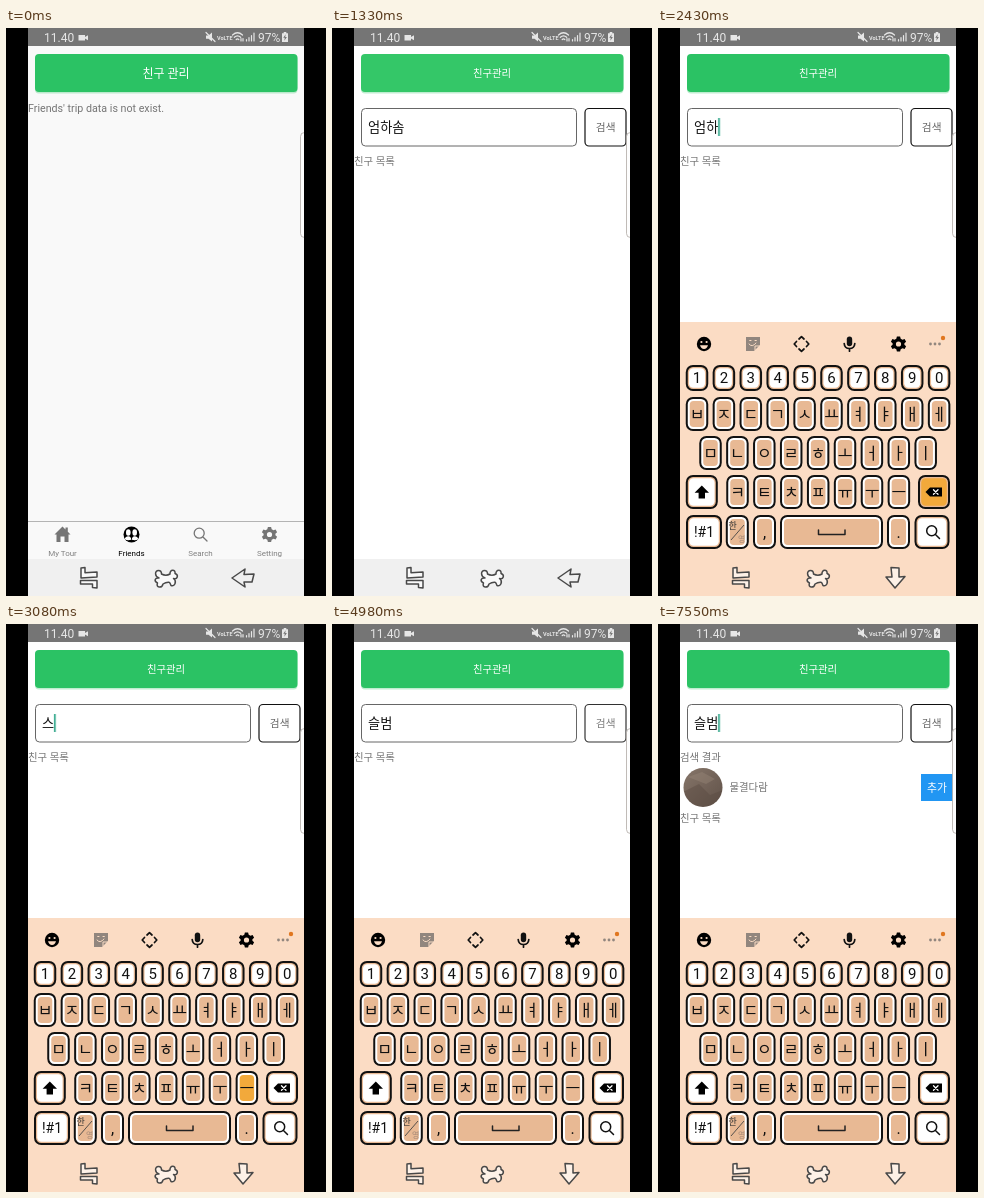
These frames come from a looping animation (320x568 px, 8000 ms). An HTML page:

```html
<!DOCTYPE html>
<html lang="ko">
<head>
<meta charset="utf-8">
<title>Friend search</title>
<style>
  html, body { margin: 0; width: 100%; height: 100%; overflow: hidden; background: #000; }
  svg { display: block; width: 100%; height: 100%; }
  text { font-family: Roboto, "Noto Sans CJK KR", "Noto Sans CJK", sans-serif; }
  .mid { text-anchor: middle; }
  .grey { fill: #757575; font-size: 10.4px; }
  .line { fill: none; stroke-linejoin: round; stroke-linecap: round; }
  .nav { stroke: #484848; stroke-width: 1.5; }
</style>
</head>
<body>
<svg viewBox="0 0 320 568">
  <defs>
    <clipPath id="phone"><rect x="22" width="276" height="568"/></clipPath>
    <clipPath id="round"><circle cx="45" cy="163.5" r="19.5"/></clipPath>
    <linearGradient id="earth" x2="1" y2="1">
      <stop stop-color="#87766a"/><stop offset="1" stop-color="#5f5047"/>
    </linearGradient>
    <path id="gear" d="M-1.6-7.4H1.6L2.2-5.2 4-4.2 6.1-5 7.6-2.2 5.9-.8V.8L7.6 2.2 6.1 5 4 4.2 2.2 5.2 1.6 7.4H-1.6L-2.2 5.2-4 4.2-6.1 5-7.6 2.2-5.9.8V-.8L-7.6-2.2-6.1-5-4-4.2-2.2-5.2ZM0-2.6A2.6 2.6 0 1 0 0 2.6 2.6 2.6 0 1 0 0-2.6Z" fill-rule="evenodd"/>
    <path id="lens" class="line" d="M3.2 3.2 7 7M4.2-.8A5 5 0 1 1-5.8-.8 5 5 0 1 1 4.2-.8Z"/>
  </defs>
  <rect width="320" height="568"/>
  <g clip-path="url(#phone)">
    <rect x="22" width="276" height="568" fill="#f9f9f9"/>

    <g id="home">
      <g id="manage">
        <rect x="29" y="27" width="262.5" height="38.5" rx="4" fill="#2bc264" opacity=".3"/>
        <rect x="29" y="26" width="262.5" height="38" rx="4" fill="#2bc264"/>
        <text class="mid" x="160" y="50" font-size="12" fill="#fff">친구 관리</text>
      </g>
      <text x="22" y="83.5" font-size="10.7" fill="#757575">Friends' trip data is not exist.</text>
      <path d="M22 493.5H298" stroke="#b4b4b4"/>
      <g fill="#757575">
        <path d="M48.5 506.5 56.5 498.5 59.5 501.5V499.5H61.8V503.8L64.5 506.5H62.5V514H58.5V508.5H54.5V514H50.5V506.5Z"/>
        <use href="#lens" x="194" y="506" stroke="#757575" stroke-width="1.3"/>
        <use href="#gear" x="263.5" y="506.5"/>
      </g>
      <circle cx="125.5" cy="506.5" r="8"/>
      <g fill="#fff">
        <ellipse cx="122.3" cy="504.5" rx="2.3" ry="3.2"/><ellipse cx="128.7" cy="504.5" rx="2.3" ry="3.2"/>
        <path d="M118.8 511Q119.5 508.2 122.3 508.2T125.2 511.8Q121 513 118.8 511ZM125.8 511.8Q126 508.2 128.7 508.2T132.2 511Q130 513 125.8 511.8Z"/>
      </g>
      <g id="tabs" class="mid" font-size="8"></g>
    </g>

    <g id="search">
      <rect x="22" y="18" width="276" height="514" fill="#fff"/>
      <rect x="29" y="27" width="262.5" height="38.5" rx="4" fill="#2bc264" opacity=".3"/>
      <rect x="29" y="26" width="262.5" height="38" rx="4" fill="#2bc264" id="header"/>
      <text class="mid" x="160" y="49.3" font-size="10.4" fill="#fff">친구관리</text>
      <rect x="29.5" y="80.5" width="215" height="37.5" rx="4" fill="#fff" stroke="#666"/>
      <g id="query" font-size="13.2" fill="#111"></g>
      <path id="compose" d="M36 107.5H60" stroke="#333" stroke-width=".8"/>
      <rect id="caret" x="35.9" y="90" width="1.6" height="18" fill="#1f9f80"/>
      <g id="find">
        <rect x="253" y="80.5" width="41" height="37.5" rx="4" fill="#fff" stroke="#111" stroke-width="1.2"/>
        <text class="mid" x="273.7" y="103" font-size="10.7" fill="#666">검색</text>
      </g>
      <text id="list" class="grey" x="22" y="137">친구 목록</text>
      <g id="result">
        <text class="grey" x="22" y="137">검색 결과</text>
        <g id="avatar" clip-path="url(#round)">
          <rect x="25" y="144" width="40" height="40" fill="url(#earth)"/>
          <path d="M25 168 41 160 52 171 65 166V184H25Z" fill="#594b42" opacity=".45"/>
          <path d="M30 153 44 148 57 155 48 160Z" fill="#9a897b" opacity=".4"/>
        </g>
        <text class="grey" x="71.5" y="167">물결다람</text>
        <rect x="263" y="150" width="32" height="27" fill="#2196f3"/>
        <text class="mid" x="279" y="168" font-size="10.8" fill="#fff">추가</text>
      </g>
    </g>

    <rect x="294.5" y="104.5" width="12" height="105" rx="4" fill="#fdfdfd" stroke="#b0aaa5" stroke-width=".8"/>

    <g id="status" fill="#e6e6e6">
      <rect x="22" width="276" height="18" fill="#757575"/>
      <text x="38" y="13.7" font-size="12">11.40</text>
      <path d="M72.5 7H79V9L82 7.2V12.3L79 10.5V12.5H72.5Z"/>
      <path d="M200 7.5H202.5L206 4.5V13.5L202.5 10.8H200Z"/>
      <path class="line" d="M200 4.5 209 13.5" stroke="#e6e6e6" stroke-width="1.2"/>
      <text x="211" y="12" font-size="5.5" font-weight="700" textLength="0">VoLTE</text>
      <g class="line" stroke="#e6e6e6" stroke-width="1.2">
        <path d="M226.5 7Q231.5 2.5 236.5 7M228.3 9.3Q231.5 6.3 234.7 9.3M230.2 11.5Q231.5 10.3 232.8 11.5M235 13V10.5M237 13V10.5"/>
        <path d="M240.5 13V11.5M243 13V9.5M245.5 13V7.5M248 13V5"/>
      </g>
      <text x="252" y="13.7" font-size="12">97%</text>
      <path d="M276 5.2H277.7V4H280.3V5.2H282V14H276Z"/>
      <path d="M279.7 6.2 277.2 9.8H278.8L278.3 12.8 280.9 9H279.2Z" fill="#757575"/>
    </g>

    <rect x="22" y="531" width="276" height="37" fill="#f0f0f0"/>
    <g id="keyboard">
      <rect x="22" y="294" width="276" height="290" fill="#fbdcc4"/>
      <circle cx="46" cy="316" r="7.2"/>
      <g fill="#fbdcc4"><circle cx="43.4" cy="314" r="1.1"/><circle cx="48.6" cy="314" r="1.1"/><path d="M42 317.3H50Q49 321 46 321T42 317.3Z"/></g>
      <path d="M88 309H102V317L96 323H88Z" fill="#91867e"/>
      <path class="line" d="M97 322V318H101.5M91 316Q94 320 98 315M91.7 312.5H93M97 312.5H98.3" stroke="#fbdcc4"/>
      <g class="line" stroke="#111" stroke-width="1.7">
        <path d="M141 311 143.5 308.7 146 311M141 321 143.5 323.3 146 321M138.5 313.5 136.2 316 138.5 318.5M148.5 313.5 150.8 316 148.5 318.5"/>
        <path d="M186.2 315.5Q186.5 320.5 191.5 320.5T196.8 315.5M191.5 320.5V323.2"/>
      </g>
      <rect x="188.8" y="308.5" width="5.4" height="9.8" rx="2.7" fill="#111"/>
      <use href="#gear" x="240.5" y="316"/>
      <g fill="#91867e"><circle cx="272.5" cy="316" r="1.4"/><circle cx="277" cy="316" r="1.4"/><circle cx="281.5" cy="316" r="1.4"/></g>
      <circle cx="285" cy="310" r="2.2" fill="#e0761f"/>
      <g id="keys"></g>
      <path d="M43.8 457.5 51 464.8H47V470.5H40.6V464.8H36.6Z"/>
      <path d="M267.5 464 272 459.5H284V468.5H272Z"/>
      <path class="line" d="M275.5 461.7 280 466.3M280 461.7 275.5 466.3" stroke="#fff" stroke-width="1.3"/>
      <path class="line" d="M160.5 502V506.5H187V502" stroke="#222" stroke-width="1.5"/>
      <use href="#lens" x="274.5" y="503.5" stroke="#111" stroke-width="1.5"/>
      <path d="M73 512 86 497" stroke="#444" stroke-width=".9"/>
      <text x="70.5" y="501" font-size="9" fill="#333">한</text>
      <text x="80" y="514" font-size="8" fill="#a58a78">영</text>
    </g>
    <g class="line nav">
      <path d="M75 540 79 539.5V544.8L91 544V549L75 550ZM74.5 552.5H91V560L86.5 559.5V556H74.5Z" fill="#fff" fill-opacity=".6"/>
      <path d="M155.5 546Q160 548.5 164 546C163.5 541 170 541 169 545.5 173 547 171.5 551.5 167.5 550.5 171 553 169 559 165 557.5Q164 554.5 163 554.3 160 554 157 556C156 560.5 149.5 560 151.5 555 147.5 553 149 549.5 153 550 148.5 548.5 148.5 542.5 152.5 542.5 155 542.5 155.5 544.5 155.5 546Z" fill="#fff" fill-opacity=".6"/>
      <path id="back" d="M226 550 239 541 238 546.5 248 546 246 554 238 554 239 559Z"/>
      <path id="hide" d="M237 560 228 549H234L233 539.5 241 540V549L247 548.5Z" fill="#fff" fill-opacity=".6"/>
    </g>
  </g>
</svg>
<script>
const LOOP = 8000, END = LOOP;
const $ = id => document.getElementById(id);

function add(parent, tag, attrs, label) {
  const el = document.createElementNS('http://www.w3.org/2000/svg', tag);
  for (const k in attrs) el.setAttribute(k, attrs[k]);
  if (label) el.textContent = label;
  parent.appendChild(el);
  return el;
}

// stops: [ms, value, easing]; without easing the value holds until the next stop
function track(el, prop, stops) {
  const last = stops[stops.length - 1];
  const frames = [...stops, [END, last[1]]].map(([ms, v, easing = 'step-end']) =>
    ({ offset: ms / LOOP, [prop]: v, easing }));
  el.animate(frames, { duration: LOOP, iterations: Infinity });
}

function show(el, from, to = END) {
  const stops = from > 0 ? [[0, 0], [from, 1]] : [[0, 1]];
  if (to < END) stops.push([to, 0]);
  track(el, 'opacity', stops);
}

['My Tour', 'Friends', 'Search', 'Setting'].forEach((name, i) =>
  add($('tabs'), 'text', { x: 56.5 + 69 * i, y: 528, fill: i === 1 ? '#000' : '#808080' }, name));

// Keyboard
const faces = {};
function key(cx, cy, w, h, label, plain, size = 16) {
  const box = (inset, attrs) => add($('keys'), 'rect', {
    x: cx - w / 2 + inset, y: cy - h / 2 + inset, width: w - 2 * inset, height: h - 2 * inset,
    rx: 7 - inset * .8, ...attrs });
  box(1, { fill: plain ? '#e8b994' : '#fff', stroke: '#111', 'stroke-width': 2 });
  faces[label] = box(plain ? 3.2 : 4, { fill: plain ? '#fff' : '#e8b994' });
  if (label.length < 4)
    add($('keys'), 'text', { x: cx, y: cy + size * .35, class: 'mid', 'font-size': size, fill: '#111' }, label);
}
const row = (chars, x, y, h, plain, size) =>
  [...chars].forEach((c, i) => key(x + 26.9 * i, y, 22.5, h, c, plain, size));

row('1234567890', 39, 350, 26, true, 15);
row('ㅂㅈㄷㄱㅅㅛㅕㅑㅐㅔ', 39, 386, 34);
row('ㅁㄴㅇㄹㅎㅗㅓㅏㅣ', 52.5, 425, 34);
row('ㅋㅌㅊㅍㅠㅜㅡ', 79.5, 464, 34);
key(43.8, 464, 32, 34, 'shift', true);
key(276, 464, 32, 34, 'delete', true);
key(46, 504, 36, 34, '!#1', true, 14);
key(79.3, 504, 23, 34, 'lang');
key(106.5, 504, 23, 34, ',');
key(173.5, 504, 103, 34, 'space');
key(240.5, 504, 23, 34, '.');
key(274, 504, 35, 34, 'enter', true);

const press = (name, from, to, color) => {
  const rest = faces[name].getAttribute('fill');
  track(faces[name], 'fill', [[0, rest], [from, color], [to, rest]]);
};
press('delete', 2430, 3080, '#f2a93b');
press('ㅡ', 3080, 3290, '#f2a93b');
press('ㄹ', 3620, 3800, '#f2a93b');
press('ㅓ', 3860, 4040, '#f2a93b');

// Typed text
const typed = [[0, '엄하솜'], [2430, '엄하'], [2720, '엄'], [2900, ''],
  [3080, '스'], [3620, '슬'], [3860, '슬버'], [4110, '슬범']];
typed.forEach(([ms, word], i) =>
  show(add($('query'), 'text', { x: 36, y: 104.3 }, word), ms, typed[i + 1]?.[0]));
track($('caret'), 'transform', typed.map(([ms, word]) => [ms, `translateX(${word.length * 12.15}px)`]));
track($('caret'), 'opacity', [[0, 0], [1930, 1], [4110, 0], [7550, 1]]);
track($('compose'), 'opacity', [[0, 0], [3860, 1], [4770, 0]]);

// Screens
track($('manage'), 'opacity', [[0, 1], [360, .85, 'ease-out'], [560, .4], [820, .4, 'ease-out'], [1070, 1]]);
track($('search'), 'opacity', [[0, 0], [820, .1, 'ease-out'], [1250, 1]]);
track($('search'), 'transform', [[0, 'translateY(42px)'], [820, 'translateY(38px)', 'cubic-bezier(.1,.7,.3,1)'], [1290, 'translateY(0px)']]);
track($('header'), 'fill', [[0, '#34c768'], [1930, '#2bc264']]);
show($('home'), 0, 1330);

show($('keyboard'), 2230);
track($('keyboard'), 'transform', [[0, 'translateY(11px)'], [2330, 'translateY(0px)']]);
track($('keyboard'), 'filter', [[0, 'grayscale(1) brightness(.93)'], [2330, 'none']]);
show($('back'), 0, 2230);
show($('hide'), 2230);

// Search result
track($('find'), 'opacity', [[0, 1], [4610, .7, 'ease-out'], [4770, .25, 'ease-in-out'], [5070, 1]]);
show($('result'), 5070);
show($('avatar'), 5290);
track($('list'), 'transform', [[0, 'translateY(0px)'], [5070, 'translateY(61px)']]);
</script>
</body>
</html>
```
